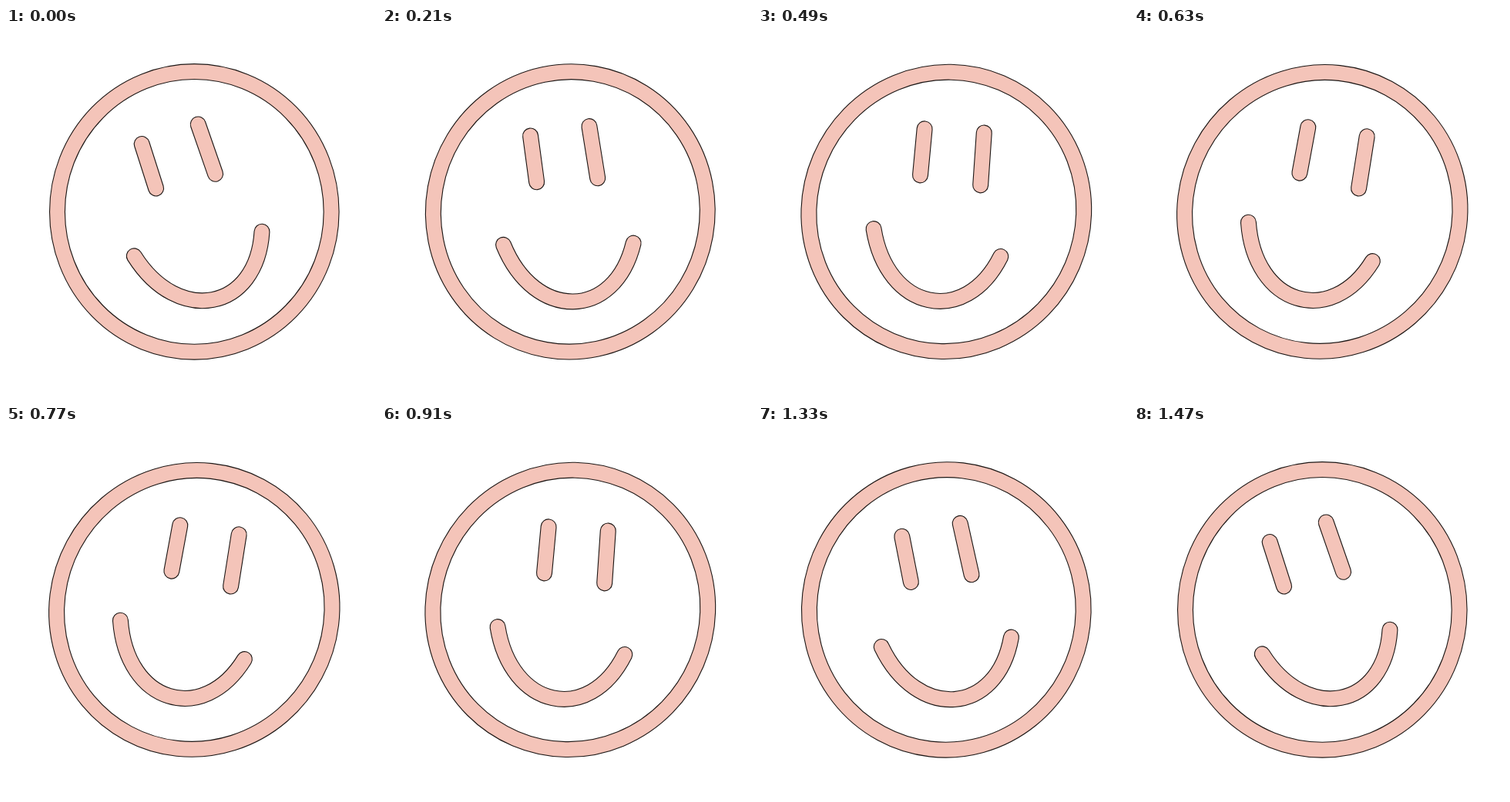
Animation of 480x480 px, one loop 1540 ms. Source, as an HTML page:

```html
<!DOCTYPE html>
<html lang="en">
<head>
<meta charset="utf-8">
<title>Rocking smiley</title>
<style>
  html, body { margin: 0; width: 100%; height: 100%; overflow: hidden; background: #fff; }
  svg { display: block; width: 100vw; height: 100vh; }
</style>
</head>
<body>
<svg viewBox="0 0 480 480">
  <defs>
    <g id="face" fill="none" stroke-linecap="round">
      <ellipse cx="244.3" cy="238.4" rx="177.8" ry="181.8"/>
      <path d="M176.2 150.5L194.6 208M249.2 125L271.6 189.3"/>
      <path d="M166.3 295.8C223.4 386.4 325.6 367 332 264.2"/>
    </g>
  </defs>
  <g id="head">
    <use href="#face" stroke="#1c1614" stroke-width="21"/>
    <use href="#face" stroke="#f4c4b9" stroke-width="18.8"/>
  </g>
</svg>
<script>
  const STEP = 70, STEPS = 22, PEAK = 10, HOLD = 15;
  const head = document.getElementById('head');

  // Tilt in degrees, nearly linear with a soft finish.
  const tilt = k => k * (3.1355 + 0.1058 * k - 0.01179 * k * k);

  function draw(now) {
    let step = Math.floor(now / STEP) % STEPS;
    if (step > HOLD) step--; // one pose on the way back lasts two steps
    const k = PEAK - Math.abs(PEAK - step);
    head.setAttribute('transform', `rotate(${tilt(k)} 244.3 238.4)`);
  }

  const start = performance.now();
  function tick() {
    draw(performance.now() - start);
    requestAnimationFrame(tick);
  }
  tick();
</script>
</body>
</html>
```
